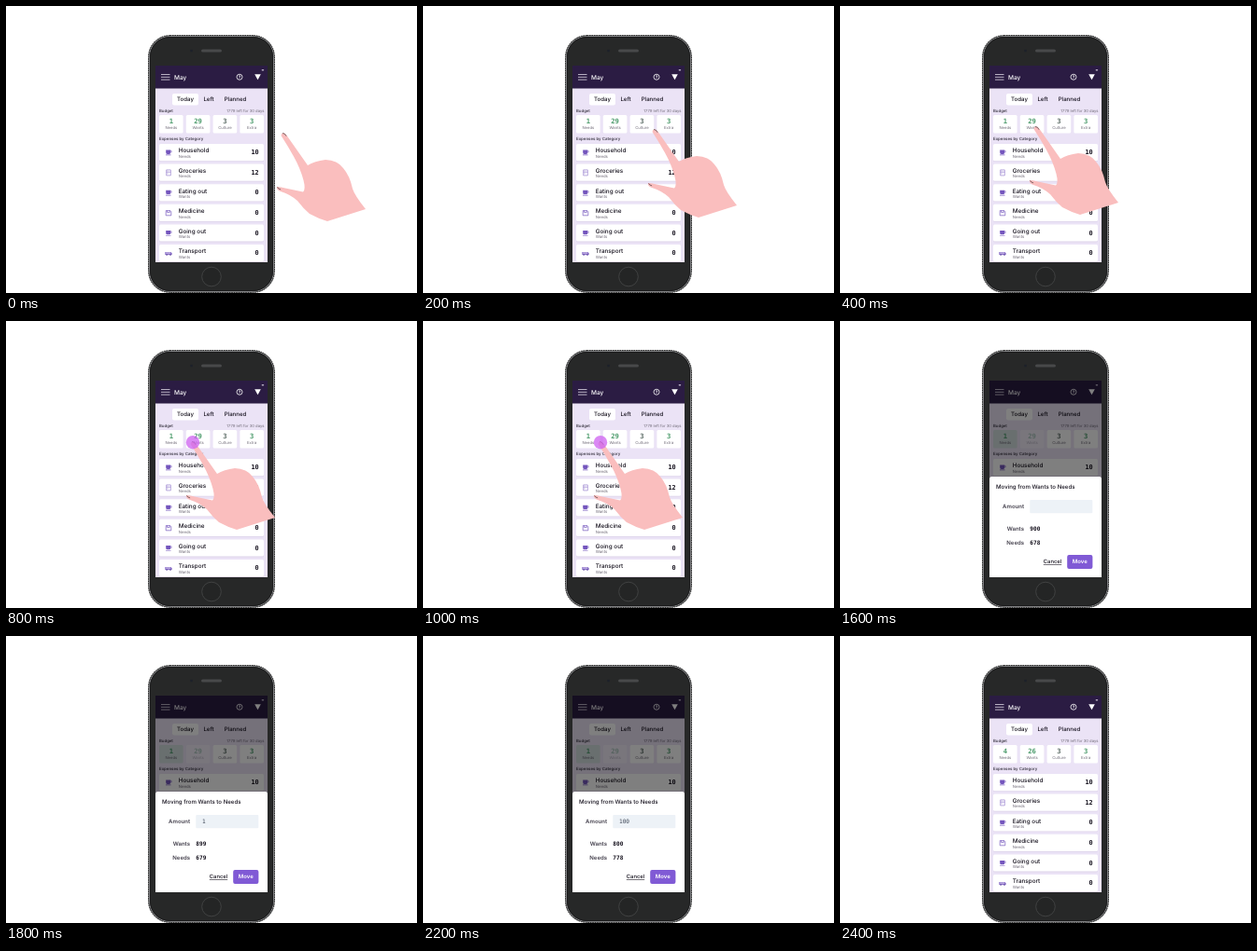
Recreate the animation shown at these times as an HTML page. Size 440 by 308 pixels, loop 3000 ms.

```html
<!DOCTYPE html>
<html lang="en">
<head>
<meta charset="utf-8">
<title>Moving budget</title>
<style>
html, body { margin: 0; width: 100%; height: 100%; overflow: hidden; background: #fff; }
svg { display: block; width: 440px; height: 308px; }
text { font-family: Inter, sans-serif; fill: #15111d; text-rendering: geometricPrecision; }
.mono { font-family: "DejaVu Sans Mono", monospace; }
</style>
</head>
<body>
<svg id="stage" viewBox="0 0 440 308">
  <defs><clipPath id="screen"><rect x="160" y="64" width="120" height="211"/></clipPath></defs>
  <g id="phone">
    <rect x="152.5" y="31.5" width="135" height="276" rx="23" fill="#272828" stroke="#2a2a2a" stroke-dasharray="1.5 1"/>
    <rect x="153.5" y="32.5" width="133" height="274" rx="22" fill="none" stroke="#8b8c8e" stroke-width=".9"/>
    <rect x="154.5" y="33.5" width="131" height="272" rx="21" fill="none" stroke="#1b1b1c"/>
    <rect x="209" y="46.6" width="22" height="3" rx="1.5" fill="#48494a"/>
    <circle cx="198.5" cy="48" r="1.3" fill="#1c202a"/>
    <circle cx="220" cy="290.5" r="10.3" fill="#242525" stroke="#48494a" stroke-width=".8"/>
  </g>
  <g clip-path="url(#screen)">
    <rect x="160" y="64" width="120" height="211" fill="#ebe3f6"/>
    <rect x="160" y="64" width="120" height="24.5" fill="#2b1c43"/>
    <g id="home"></g>
    <rect id="shade" x="160" y="64" width="120" height="211" fill="#000" opacity=".5"/>
    <g id="dialog"></g>
  </g>
  <g id="hand">
    <path fill="#fabebe" d="M294.500 139 Q295 135.500 298 136.500 Q300 137.500 302 141
      L323 171 Q330 166.500 342 165 Q355 165.500 361 174 Q368 182 371 196
      Q373 203 385 218 L344 231 Q334 228 325 223 Q318 217 312 209
      Q304 202 294 199 Q289 197 290 194 Q293 193.500 299 195.500
      L318 199.500 Q321 197 318.500 187 Q315 174 308 161.500 Q301 149 294.500 139Z"/>
    <path d="M296 136.500l2.500 .8l1.600 2.400M290.500 194.300l1.200 1.600l2.400 1" fill="none" stroke="#4b3a3d" stroke-width=".7"/>
  </g>
  <circle id="touch" cy="130.200" r="7.200" fill="#ce62f0" opacity=".76"/>
</svg>
<script>
const $ = id => document.getElementById(id);
const rect = (x, y, w, h, fill = '#fff', rx = 1.5, attrs = '') =>
  `<rect x="${x}" y="${y}" width="${w}" height="${h}" rx="${rx}" fill="${fill}" ${attrs}/>`;
const text = (x, y, size, str, attrs = '') =>
  `<text x="${x}" y="${y}" font-size="${size}" ${attrs}>${str}</text>`;
const mid = ' text-anchor="middle" ', end = ' text-anchor="end" ';
const medium = ' font-weight="500" ', bold = ' font-weight="600" ';
const mono = ' class="mono" font-weight="700" ';
const color = c => ` style="fill:${c}" `;
const grey = color('#716c79'), dark = color('#44404d'), white = color('#fff');

const icons = {
  cup: '<path d="M-2.800 -2.700H2.200V0Q2.200 1.600 .7 1.600H-1.300Q-2.800 1.600 -2.800 0Z M-3 2.200H2.500V2.900H-3Z" fill="#7456bd"/><path d="M2.200 -1.900H3.100V-.2H2.200" fill="none" stroke="#7456bd" stroke-width=".6"/>',
  fridge: '<path d="M-2.300 -3H2.300V3H-2.300Z M-2.300 -.7H2.300 M-1 -2.200V-1.500 M-1 .3V1.400" fill="none" stroke="#8a70c8" stroke-width=".6"/>',
  box: '<path d="M-2.800 -2.500H1.800L2.800 -1.500V2.700H-2.800Z M-1.500 -2.500V-.7H1.300V-2.500" fill="none" stroke="#7456bd" stroke-width=".7"/>',
  van: '<path d="M-3.700 -1.400H2.500L3.700 .3V1.700H-3.700Z" fill="#8a70c8"/><path d="M-2.800 -.7H2V.2H-2.800Z" fill="#e9e2f6"/><circle cx="-1.900" cy="1.800" r=".8" fill="#5d45a0"/><circle cx="2" cy="1.800" r=".8" fill="#5d45a0"/>'
};

const green = '#4b9b6b';
const cards = [['Needs', green], ['Wants', green], ['Culture', '#5f6f69'], ['Extra', green]];
const rows = [
  ['Household', 'Needs', 10, 'cup'], ['Groceries', 'Needs', 12, 'fridge'],
  ['Eating out', 'Wants', 0, 'cup'], ['Medicine', 'Needs', 0, 'box'],
  ['Going out', 'Wants', 0, 'cup'], ['Transport', 'Wants', 0, 'van']
];

const header =
  '<path d="M166 73.500h9.500M166 76.300h9.500M166 79.100h9.500" stroke="#ddd8e5" stroke-width=".8"/>' +
  text(180, 78.6, 6.5, 'May', medium + white) +
  '<circle cx="250" cy="76.200" r="3" fill="none" stroke="#fff" stroke-width=".8"/>' +
  text(250, 78, 4.8, '?', mid + bold + white) +
  '<path d="M266.200 73.300h6.600l-3.300 6z" fill="#fff"/>' +
  rect(273.6, 68, 2.6, 1.6, '#b9b2c5', .8);

const tabs =
  rect(178, 94, 28, 12.5, '#fff', 2) +
  text(192, 102.2, 6.1, 'Today', mid + medium) +
  text(217, 102.2, 6.1, 'Left', mid + medium) +
  text(245.5, 102.2, 6.1, 'Planned', mid + medium);

const card = ([name, tint], i) => {
  const x = 164 + 28.8 * i;
  return `<g id="card${i}">` + rect(x, 117, 25.6, 19.5, '#fff', 1.5, `id="back${i}"`) +
    text(x + 12.8, 126.3, 7.2, '', mono + mid + color(tint) + `id="n${i}"`) +
    text(x + 12.8, 131.8, 4.2, name, mid + grey) + '</g>';
};

const row = ([name, kind, sum, icon], i) => {
  const y = 148 + 21.6 * i;
  return rect(164, y + .6, 112, 18.4, '#ddd3ea') + rect(164, y, 112, 18.2) +
    `<g transform="translate(174 ${y + 9.3})">${icons[icon]}</g>` +
    text(184.7, y + 9.4, 6.35, name, medium) +
    text(184.7, y + 14.7, 4.3, kind, grey) +
    text(270.7, y + 11.2, 6.8, sum, mono + end);
};

$('home').innerHTML = header + tabs +
  text(164, 114, 4.3, 'Budget', bold + dark) +
  text(276.5, 114, 4.2, '1779 left for 30 days', end + grey) +
  cards.map(card).join('') +
  text(164, 144.3, 4.35, 'Expenses by Category', bold + dark) +
  rows.map(row).join('');

const field = (y, name, id) =>
  text(197, y, 6, name, bold + end + dark) + text(203.3, y, 6.1, '', mono + `id="${id}"`);

$('dialog').innerHTML =
  rect(160, 167, 120, 111, '#fff', 2.5) +
  text(167, 180.2, 6.1, 'Moving from Wants to Needs', medium) +
  text(197, 201.3, 6, 'Amount', bold + end + dark) +
  rect(203.3, 192, 67, 14.3, '#edf2f7', 1) +
  text(210, 201.4, 6.1, '', 'class="mono" id="amount"' + color('#3d4656')) +
  field(225, 'Wants', 'wants') +
  field(240, 'Needs', 'needs') +
  text(227.5, 260.3, 5.85, 'Cancel', mid + medium + 'text-decoration="underline"') +
  rect(243.2, 251, 27.2, 15, '#805ad5', 2) +
  text(256.8, 260.4, 6, 'Move', mid + bold + white);

const show = (id, on) => $(id).style.display = on ? '' : 'none';
const put = (id, value) => $(id).textContent = value;

function draw(ms) {
  const step = Math.floor(ms % 3000 / 200);
  const open = step >= 8 && step < 12, moved = step >= 12;

  // The hand arrives, presses on Wants, drags to Needs and lets go.
  const drag = Math.max(0, Math.min(3, step - 3));
  const dx = [0, -49][step] ?? -87 - 10 * drag;
  const dy = [0, -4][step] ?? -7;
  $('hand').setAttribute('transform', `translate(${dx} ${dy})`);
  $('touch').setAttribute('cx', 297 + dx);
  show('hand', step < 8);
  show('touch', step >= 3 && step <= 6);

  [moved ? 4 : 1, moved ? 26 : 29, 3, 3].forEach((n, i) => put('n' + i, n));
  $('back0').setAttribute('fill', open ? '#d3e0e0' : '#fff');
  $('card1').style.opacity = open ? .4 : 1;
  show('shade', open);
  show('dialog', open);

  const typed = open ? '100'.slice(0, step - 8) : '';
  put('amount', typed);
  put('wants', 900 - typed);
  put('needs', 678 + +typed);
}

const start = performance.now();
function tick(now) {
  draw(Math.max(0, now - start));
  requestAnimationFrame(tick);
}
draw(0);
requestAnimationFrame(tick);
</script>
</body>
</html>
```
